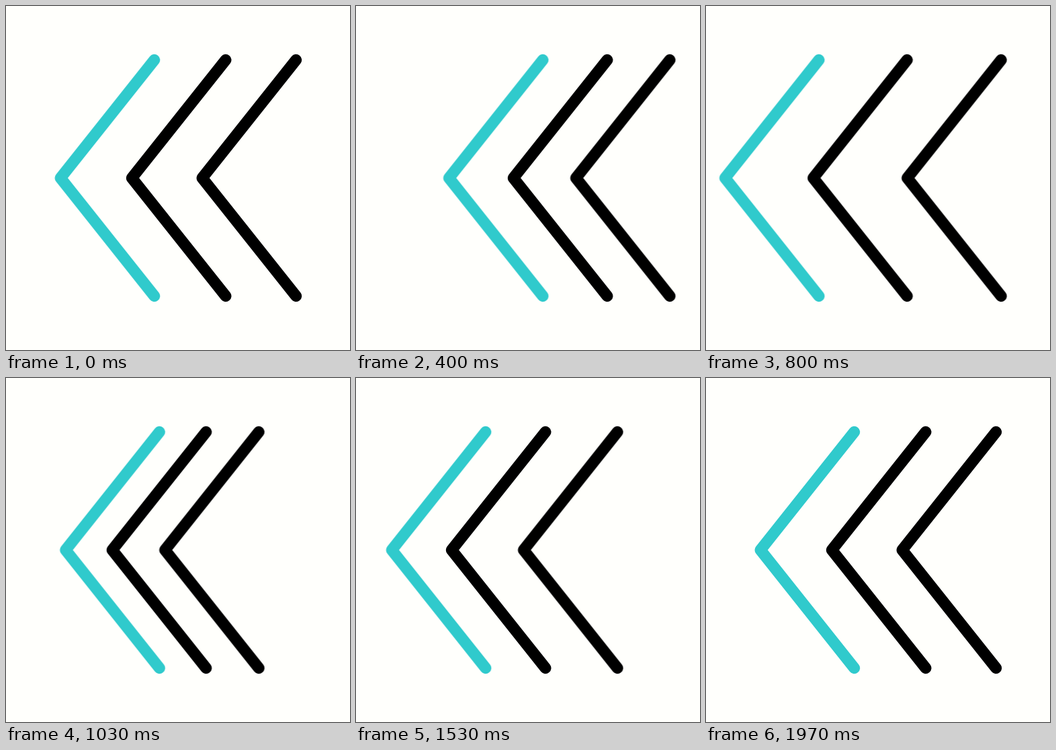
Animation, 512 px wide and 512 px high, one loop 2010 ms. Source, as an HTML page:

```html
<!DOCTYPE html>
<html lang="en">
<head>
<meta charset="utf-8">
<title>Chevrons left</title>
<style>
  html, body {
    margin: 0;
    width: 100%;
    height: 100%;
    overflow: hidden;
    background: #fffffc;
  }
  svg {
    display: block;
    width: 100%;
    height: 100%;
  }
  .chevron {
    fill: none;
    stroke: #000;
    stroke-width: 17;
    stroke-linecap: round;
    stroke-linejoin: round;
    animation: sway 2010ms cubic-bezier(.37, 0, .63, 1) infinite;
    animation-delay: calc(var(--i) * 67ms);
  }
  .lead {
    stroke: #30cacc;
  }
  /* A damped swing; each chevron follows the one before it. */
  @keyframes sway {
    0% {
      transform: translateX(0);
      animation-timing-function: cubic-bezier(.4, .2, .7, .85);
    }
    24.4% { transform: translateX(67px); }
    42.7% { transform: translateX(-60px); }
    56.7% { transform: translateX(40px); }
    71.4% {
      transform: translateX(-46px);
      animation-timing-function: cubic-bezier(.33, 0, .1, 1);
    }
    90.5%, 100% { transform: translateX(0); }
  }
</style>
</head>
<body>
<svg viewBox="0 0 512 512">
  <path class="chevron lead" style="--i: 0" d="M220.7 80.3 L81 256 L220.7 431.7"/>
  <path class="chevron" style="--i: 1" d="M327 80.3 L187.3 256 L327 431.7"/>
  <path class="chevron" style="--i: 2" d="M431.7 80.3 L292 256 L431.7 431.7"/>
</svg>
</body>
</html>
```
